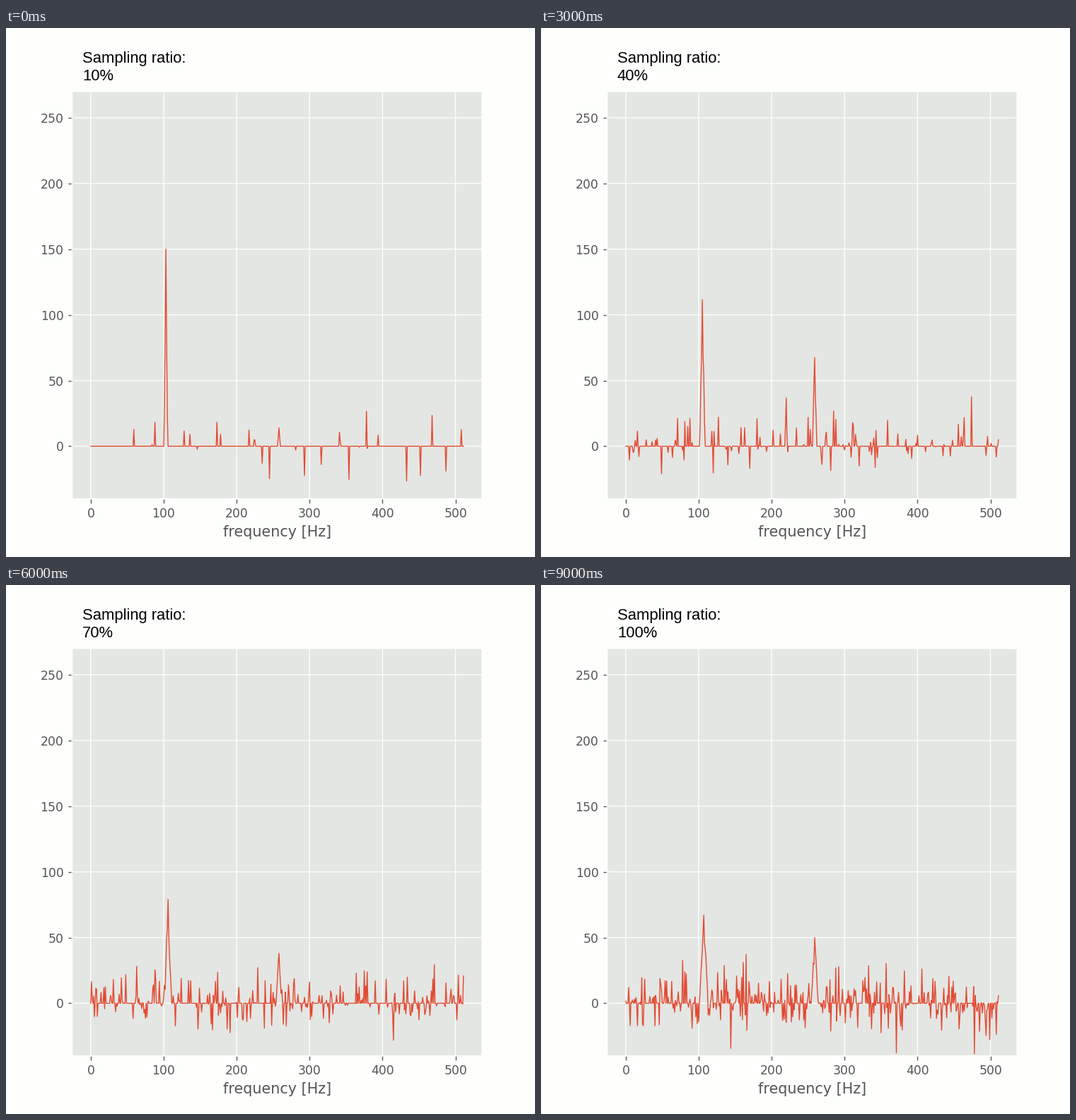
Write a matplotlib script that moves like this. It is 748 px wide and 748 px high and loops after 10000 ms.

```python
import matplotlib.pyplot as plt
import numpy as np
from matplotlib.animation import FuncAnimation

SIZE, INCHES = 748, 6
DPI = SIZE / INCHES
BINS, STEPS = 512, 10
PAPER, PANEL, INK, RED = "#fdfffd", "#e4e6e3", "#555555", "#e24a33"

freq = np.arange(BINS)
KEY_RATIOS = [0.1, 0.3, 0.5, 0.7, 1.0]
LOW_TONE = [150, 128, 95, 79, 67]
HIGH_TONE = [14, 68, 67, 38, 50]


def sparse_noise(rng, ratio):
    """Soft-thresholded noise: more bins survive as more samples are taken."""
    spread = 14 + 1.4 / ratio
    raw = rng.normal(0.1 * spread, spread, BINS)
    limit = np.quantile(np.abs(raw), 1 - 0.55 * ratio)
    return np.sign(raw) * np.maximum(np.abs(raw) - limit, 0)


def add_tone(y, rng, centre, height, width):
    """Replace the bins around centre with a jagged triangular peak."""
    shape = 1 - np.abs(freq - centre) / width
    jag = np.where(freq == centre, 1, rng.uniform(0.75, 1.1, BINS))
    return np.where(shape > 0, height * shape * jag, y)


def spectrum(step):
    ratio = (step + 1) / STEPS
    rng = np.random.default_rng(70 + step)
    width = 2 + 4 * ratio
    y = sparse_noise(rng, ratio)
    y = add_tone(y, rng, 103 + round(4 * ratio),
                 np.interp(ratio, KEY_RATIOS, LOW_TONE), width)
    return add_tone(y, rng, 258 + step % 2,
                    np.interp(ratio, KEY_RATIOS, HIGH_TONE), 0.8 * width)


plt.rcParams["font.family"] = "DejaVu Sans"
fig = plt.figure(figsize=(INCHES, INCHES), dpi=DPI, facecolor=PAPER)
ax = fig.add_axes([0.125, 0.11, 0.775, 0.77], facecolor=PANEL)
ax.patch.set_snap(False)
ax.set_axisbelow(True)
ax.set_xlim(-25.55, 536.55)
ax.set_ylim(-40, 270)
ax.set_xticks(range(0, 501, 100))
ax.set_yticks(range(0, 251, 50))
ax.grid(color=PAPER, linewidth=0.8, snap=False)
ax.tick_params(color=INK, labelcolor=INK, labelsize=10)
plt.setp(list(ax.get_xticklines()) + list(ax.get_yticklines()), snap=False)
plt.setp(list(ax.spines.values()), color=PAPER, linewidth=1, snap=False)
ax.set_xlabel("frequency [Hz]", color=INK, fontsize=12)
line, = ax.plot(freq, spectrum(0), color=RED, linewidth=0.8)


def header(baseline, words):
    return fig.text(108 / SIZE, 1 - baseline / SIZE, words, color="black",
                    family="Liberation Sans", fontsize=22 * 72 / DPI,
                    va="baseline")


header(49, "Sampling ratio:")
percent = header(74, "10%")


def draw(step):
    line.set_ydata(spectrum(step))
    percent.set_text(f"{100 * (step + 1) // STEPS}%")
    return line, percent


anim = FuncAnimation(fig, draw, frames=STEPS, interval=1000,
                     repeat=True, repeat_delay=0)
plt.show()
```
